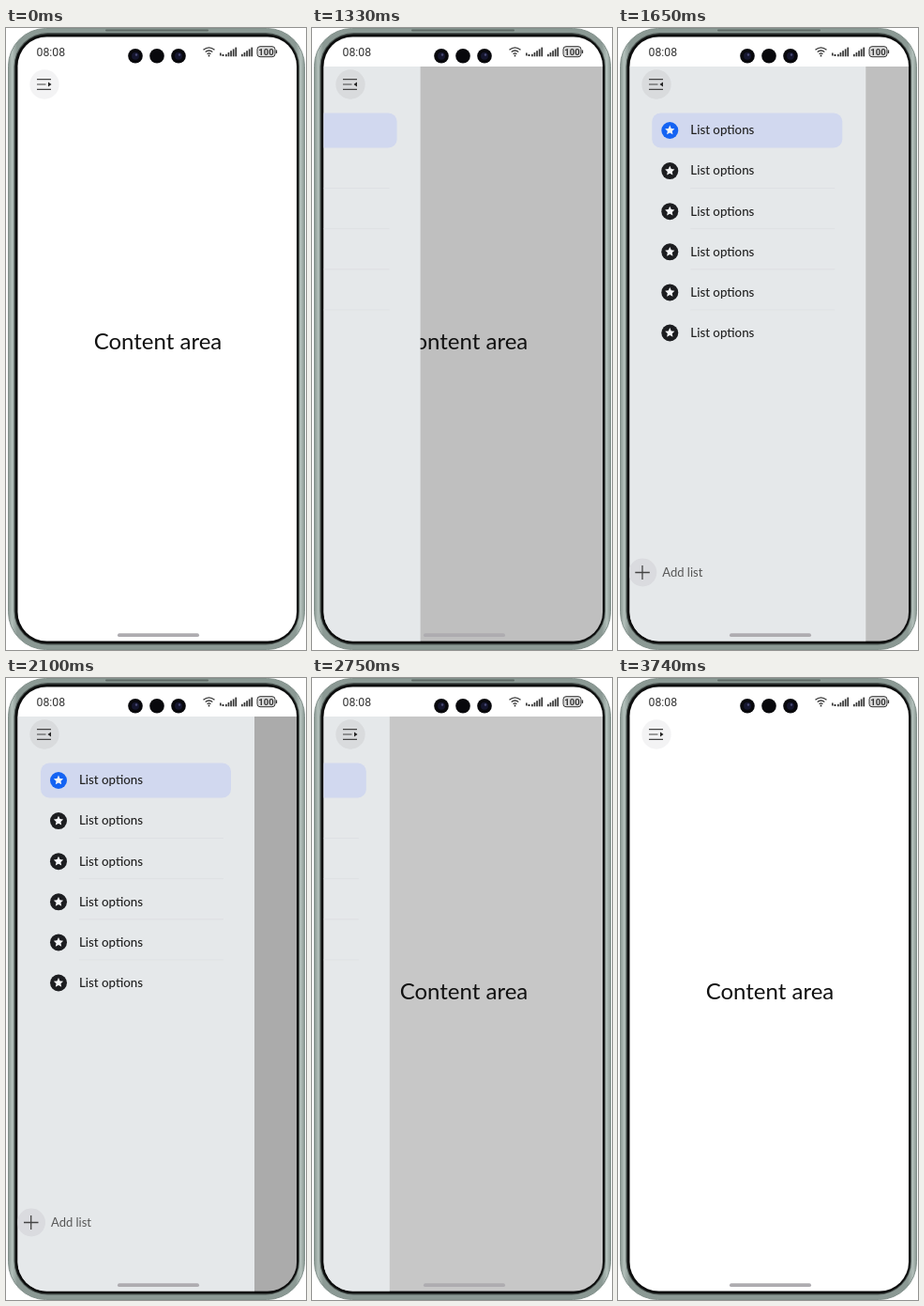
An HTML page for the animation above (3.82 s loop, 320 by 662 pixels).

```html
<!DOCTYPE html>
<html lang="en">
<head>
<meta charset="utf-8">
<title>Side panel</title>
<style>
  html, body { margin: 0; width: 100%; height: 100%; overflow: hidden; background: #fff; }
  svg { display: block; width: 320px; height: 662px; }
  text { font-family: Lato, "Open Sans", sans-serif; }
</style>
</head>
<body>
<svg viewBox="0 0 320 662">
  <defs>
    <linearGradient id="metal">
      <stop offset="0" stop-color="#87958f"/>
      <stop offset=".012" stop-color="#b3c0bb"/>
      <stop offset=".03" stop-color="#8b9994"/>
      <stop offset=".97" stop-color="#8b9994"/>
      <stop offset=".988" stop-color="#b3c0bb"/>
      <stop offset="1" stop-color="#87958f"/>
    </linearGradient>
    <clipPath id="screen"><rect x="12.5" y="9.5" width="297.5" height="643" rx="31"/></clipPath>
    <path id="star" fill="#f4f5f7"/>
  </defs>

  <rect x="2.5" y=".5" width="316" height="661" rx="40" fill="url(#metal)" stroke="#83918c"/>
  <rect x="8.5" y="5" width="304.5" height="651.5" rx="36" fill="#4b5451"/>
  <rect x="9.7" y="6.5" width="302.3" height="648.8" rx="34" fill="#0c0d0d"/>
  <rect x="106" y="1.5" width="110" height="2" rx="1" fill="#5f6a66"/>

  <g clip-path="url(#screen)">
    <rect x="12" y="9" width="299" height="645" fill="#fff"/>
    <rect id="scrim" x="12" y="41" width="299" height="613"/>
    <text x="162" y="341.5" font-size="24" fill="#111" text-anchor="middle">Content area</text>

    <g id="panel">
      <rect x="12" y="41" width="253" height="613" fill="#e5e8ea"/>
      <rect x="37" y="90.5" width="203" height="37" rx="9" fill="#d1d8ef"/>
      <g id="list" font-size="13.3" font-weight="500" fill="#222"></g>
      <circle cx="27" cy="579.5" r="15" fill="#dadbdf"/>
      <path d="M19 579.5h15.500M26.700 572v15" stroke="#444" stroke-width="1.300"/>
      <text x="48" y="584" font-size="13" fill="#555">Add list</text>
    </g>

    <circle id="button" cx="41" cy="60" r="15.700"/>
    <path d="M33 54.700h15M33 60h9.500M33 65.300h15" stroke="#444" stroke-width="1.200"/>
    <path id="arrow" fill="#222"/>
    <rect x="119" y="644.300" width="87" height="3.800" rx="1.900" fill="#aeacb0"/>
  </g>

  <g fill="#333">
    <text x="32.500" y="29.800" font-size="12.300" style="font-family:Roboto,sans-serif">08:08</text>
    <g fill="none" stroke="#333" stroke-width="1.300">
      <path d="M210.500 23.300q6-5 12 0M212.700 25.600q3.800-3.200 7.600 0M214.600 27.700q1.900-1.600 3.800 0"/>
      <rect x="268" y="19.700" width="19" height="11" rx="3" fill="#ddd" stroke-width="1"/>
      <path d="M288.500 23.500v3.500"/>
    </g>
    <circle cx="216.500" cy="29.500" r="1"/>
    <g id="bars"></g>
    <text x="277.500" y="28.700" font-size="9.500" font-weight="700" text-anchor="middle" style="font-family:Roboto,sans-serif">100</text>
  </g>
  <g id="cameras"></g>
</svg>
<script>
const LOOP = 3820;
const $ = id => document.getElementById(id);
const clamp = v => Math.min(1, Math.max(0, v));
const ramp = (t, from, to) => clamp((t - from) / (to - from));
const smooth = u => u * u * (3 - 2 * u);

// cubic-bezier(.2, 0, .2, 1)
function friction(x) {
  let lo = 0, hi = 1;
  for (let i = 0; i < 24; i++) {
    const u = (lo + hi) / 2;
    if (0.6 * u * (1 - u) + u ** 3 < x) lo = u; else hi = u;
  }
  return smooth(hi);
}

function build() {
  const points = Array.from({ length: 10 }, (_, i) => {
    const r = i % 2 ? 2.6 : 5.4, a = i * Math.PI / 5;
    return `${(r * Math.sin(a)).toFixed(2)},${(-r * Math.cos(a)).toFixed(2)}`;
  });
  $('star').setAttribute('d', `M${points.join('L')}Z`);

  let list = '', bars = '', cameras = '';
  for (let i = 0; i < 6; i++) {
    const y = 109 + 43.1 * i;
    list += `<circle cx="56" cy="${y}" r="9" fill="${i ? '#1c1d20' : '#1463f3'}"/>
      <use href="#star" x="56" y="${y}"/><text x="78" y="${y + 4.3}">List options</text>`;
    if (i && i < 5) list += `<path d="M78 ${y + 18.5}h154" stroke="#dcdee1" stroke-width=".8"/>`;
  }
  for (const x of [234, 251]) {
    for (let i = 0; i < 5; i++) {
      const h = 2.5 + 1.8 * i;
      bars += `<rect x="${x + 2.6 * i}" y="${30.3 - h}" width="1.7" height="${h}"/>`;
    }
  }
  bars += '<rect x="228" y="26.500" width="1.600" height="3"/><rect x="230.500" y="28" width="2" height="2"/>';
  [138, 161, 184].forEach((x, i) => {
    cameras += `<circle cx="${x}" cy="29.800" r="7.800" fill="#08080c"/>`;
    if (i !== 1) cameras += `<circle cx="${x}" cy="29.800" r="4" fill="#15162e"/>
      <circle cx="${x + 1}" cy="28.500" r="1.200" fill="#4b4c78"/>`;
  });
  $('list').innerHTML = list;
  $('bars').innerHTML = bars;
  $('cameras').innerHTML = cameras;
}

function draw(t) {
  const open = friction(ramp(t, 1224, 1684)) - smooth(ramp(t, 2510, 2880));
  const shade = (0.25 * ramp(t, 1200, 1320) + 0.08 * ramp(t, 1650, 1770)) * (1 - ramp(t, 2690, 2870));
  $('panel').setAttribute('transform', `translate(${253 * (open - 1)} 0)`);
  $('scrim').setAttribute('opacity', shade);
  $('button').setAttribute('fill', open > 0.1 ? '#d9dbdd' : '#f3f3f4');
  const pointsLeft = t >= 1250 && t < 2510;
  $('arrow').setAttribute('d', pointsLeft ? 'M48 57.500v5l-3.500-2.500z' : 'M45 57.500v5l3.500-2.500z');
}

function tick() {
  draw(performance.now() % LOOP);
  requestAnimationFrame(tick);
}

build();
tick();
</script>
</body>
</html>
```
